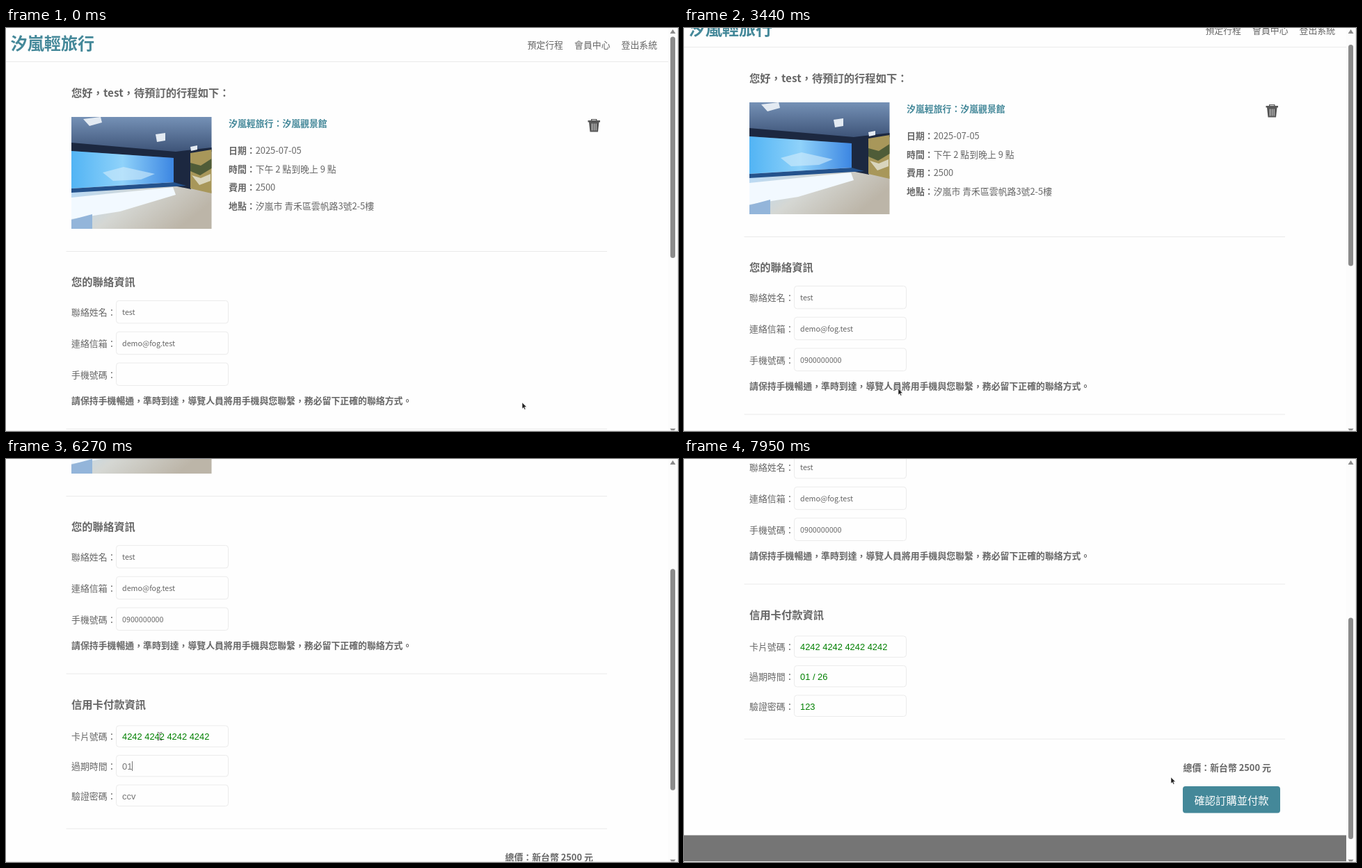
Write an HTML page that moves like this. It is 966 px wide and 580 px high and loops after 8000 ms.

```html
<!DOCTYPE html>
<html lang="zh-Hant">
<head>
<meta charset="utf-8">
<title>預定行程</title>
<style>
  html, body { margin: 0; height: 100%; overflow: hidden; background: #fefefe; }
  svg { display: block; width: 100vw; height: 100vh; }
  text { font: 12.88px "Noto Sans CJK TC", "Noto Sans CJK JP", "Noto Sans CJK", sans-serif; fill: #666; white-space: pre; }
  .b { font-weight: 700; }
  .h { font-size: 15.3px; font-weight: 700; }
  .logo { font-size: 24.15px; font-weight: 700; }
  .teal { fill: #489; }
  .button { font-size: 15.3px; fill: #fff; }
  .in { font-size: 10.73px; }
  .card { font-family: "Liberation Sans", Arial, sans-serif; }
  .line { stroke: #eaeaea; fill: none; }
  .box { stroke: #ebebeb; fill: #fefefe; }
</style>
</head>
<body>
<svg viewBox="0 0 966 580">
  <defs>
    <linearGradient id="ceiling" x2="0" y2="1">
      <stop stop-color="#7591b6"/><stop offset="1" stop-color="#33486c"/>
    </linearGradient>
    <linearGradient id="screen">
      <stop stop-color="#52b4f4"/><stop offset=".5" stop-color="#8fd2fa"/><stop offset="1" stop-color="#3c86e2"/>
    </linearGradient>
    <linearGradient id="floor" x2="1" y2=".4">
      <stop stop-color="#b5dafa"/><stop offset=".5" stop-color="#d5d7d3"/><stop offset="1" stop-color="#bcb5a8"/>
    </linearGradient>
  </defs>

  <g id="page">
    <text class="logo teal" x="6.5" y="31">汐嵐輕旅行</text>
    <text x="749.4" y="29">預定行程</text>
    <text x="817" y="29">會員中心</text>
    <text x="884.6" y="29">登出系統</text>
    <path class="line" d="M0 48.5H952M86.5 321.5H864M86.5 577H864M86.5 800H864"/>

    <text class="h" x="94" y="99">您好，test，待預訂的行程如下：</text>
    <g transform="translate(94 128)">
      <path fill="url(#ceiling)" d="M0 0H201.5V60H0z"/>
      <path fill="url(#floor)" d="M0 106L147 98L201.5 106V161H0z"/>
      <path fill="#1c2840" d="M0 37L150 50L201.5 44V50L172 54V104L147 99V59L0 49z"/>
      <path fill="url(#screen)" d="M0 49L147 59V94L0 103z"/>
      <path fill="#d3edfc" d="M45 80L75 72L120 82L100 90L60 92z" opacity=".6"/>
      <path fill="#24528c" d="M0 103L147 94L165 99L0 109z"/>
      <path fill="#f2f9ff" d="M0 116L146 101L150 112L70 136L0 147z"/>
      <path fill="#93b5da" d="M0 148L30 140V161H0z"/>
      <path fill="#a8975a" d="M171 52L201.5 47V110L171 103z"/>
      <path fill="#4f5c38" d="M171 66L186 70L201.5 60V74L185 84L171 78z"/>
      <path fill="#d9d5bd" d="M173 84L186 88L200 82V92L184 98z"/>
      <path fill="#e3eaf2" d="M17 3L42 0L44 8L26 13zM121 25L135 23V34L123 36zM171 43L181 41V47L172 49z"/>
    </g>
    <text class="b teal" x="320" y="142">汐嵐輕旅行：汐嵐觀景館</text>
    <text x="320" y="181"><tspan class="b">日期：</tspan>2025-07-05</text>
    <text x="320" y="208"><tspan class="b">時間：</tspan>下午 2 點到晚上 9 點</text>
    <text x="320" y="234"><tspan class="b">費用：</tspan>2500</text>
    <text x="320" y="261"><tspan class="b">地點：</tspan>汐嵐市 青禾區雲帆路3號2-5樓</text>
    <path fill="#585858" d="M836.5 133H841V131H849.5V133H854V135.5H852.5L851 149.5H839.5L838 135.5H836.5z"/>
    <path stroke="#e4e4e4" d="M842.5 137.5V147.5M845.3 137.5V147.5M848.1 137.5V147.5M842.3 132.5H848.2"/>

    <text class="h" x="94" y="371">您的聯絡資訊</text>
    <text class="b" x="94" y="541">請保持手機暢通，準時到達，導覽人員將用手機與您聯繫，務必留下正確的聯絡方式。</text>
    <text class="h" x="94" y="627">信用卡付款資訊</text>
    <g id="form"></g>
    <rect id="caret" width="1"/>

    <text class="b" x="717.5" y="846">總價：新台幣 2500 元</text>
    <rect x="717" y="868" width="140" height="38.5" rx="4" fill="#489"/>
    <text class="button" x="733.5" y="894">確認訂購並付款</text>
    <rect y="938.5" width="952" height="90" fill="#757575"/>
  </g>

  <rect x="952" width="14" height="580" fill="#fcfcfc"/>
  <g fill="#8b8b8b">
    <path d="M958.5 2L962.5 8H954.5zM954.5 576.5H962.5L958.5 582z"/>
    <rect id="thumb" x="955" y="12.5" width="7" height="318.5" rx="3.5"/>
  </g>
  <path class="line" d="M965.5 0V579.5H0"/>
  <path id="arrow" fill="#222" stroke="#fff" stroke-width=".5" d="M0 0V9L2 7.2L3.5 10.2L4.9 9.5L3.5 6.6H6.4z"/>
  <path id="beam" fill="none" stroke="#666" d="M-3.5-5.5H-1L0-4.5L1-5.5H3.5M0-4.5V4.5M-3.5 5.5H-1L0 4.5L1 5.5H3.5"/>
</svg>

<script>
const LOOP = 8000, BLINK = 500, STEP = 70, LEFT = 167;
const $ = id => document.getElementById(id);
const add = (name, attrs, text = "") => {
  const el = document.createElementNS("http://www.w3.org/2000/svg", name);
  for (const k in attrs) el.setAttribute(k, attrs[k]);
  el.textContent = text;
  return $("form").appendChild(el);
};

// A typed field gets its text in `steps` equal bursts, one every `every` ms
const contact = [
  { label: "聯絡姓名：", text: "test" },
  { label: "連絡信箱：", text: "demo@fog.test" },
  { label: "手機號碼：", text: "0900000000", focus: 450, start: 1115, every: 165, steps: 10 }
];
const card = [
  { label: "卡片號碼：", hint: "**** **** **** ****", text: "4242 4242 4242 4242", focus: 4560, start: 5200, every: 76, steps: 8 },
  { label: "過期時間：", hint: "MM / YY", text: "01 / 26", focus: 5810, start: 6270, every: 130, steps: 4 },
  { label: "驗證密碼：", hint: "ccv", text: "123", focus: 6660, start: 6860, every: 165, steps: 3 }
];

function layOut(rows, top, pitch, height, isCard) {
  rows.forEach((f, i) => {
    Object.assign(f, { isCard, height, top: top + pitch * i });
    const base = Math.round(f.top + 20.5);
    add("text", { x: 94, y: base + (isCard ? 0 : 1) }, f.label);
    add("rect", { class: "box", x: 158.5, y: f.top, width: 161, height, rx: 4 });
    f.el = add("text", { class: isCard ? "card" : "in", x: LEFT, y: base }, f.text);
    f.caretTop = base - 12;
  });
}
layOut(contact, 392.4, 44.8, 32.5, false);
layOut(card, 651.8, 42.6, 30.5, true);
const fields = [...contact, ...card];
const typed = fields.filter(f => f.steps);

// Moves as [start, end, ...goal]
const scrolls = [[3382, 3720, 267], [3800, 3860, 268], [7650, 7950, 397]];
const mouse = [[60, 620, 292, 497], [3040, 3440, 308, 519], [3440, 3720, 322, 412],
  [3800, 4560, 221, 399], [7190, 7530, 589, 361], [7530, 7950, 700, 458]];

const smooth = p => p * p * (3 - 2 * p);

// Eases through the moves in steps of STEP ms, counted back from each end
function glide(moves, from, t) {
  let at = from;
  for (const [start, end, ...goal] of moves) {
    const left = Math.ceil(Math.max(0, end - t) / STEP) * STEP;
    const p = smooth(Math.max(0, 1 - left / (end - start)));
    at = at.map((v, i) => v + (goal[i] - v) * p);
  }
  return at.map(Math.round);
}

function drawFields(t) {
  let active = null, since = 0;
  for (const f of typed) {
    const n = Math.min(f.steps, Math.max(0, Math.floor((t - f.start) / f.every) + 1));
    f.value = f.text.slice(0, Math.ceil(f.text.length * n / f.steps));
    f.color = !f.isCard ? "#666" : n === f.steps ? "green" : "#757575";
    f.el.textContent = f.value || f.hint || "";
    f.el.style.fill = f.color;
    if (t >= f.focus) {
      active = f;
      since = n ? f.start + f.every * (n - 1) : f.focus;
    }
  }
  const on = active && Math.floor((t - since) / BLINK) % 2 === 0;
  const caret = $("caret");
  caret.style.display = on ? "" : "none";
  if (!on) return;
  const width = active.value ? active.el.getComputedTextLength() : 0;
  caret.setAttribute("x", Math.round(LEFT + width));
  caret.setAttribute("y", active.caretTop);
  caret.setAttribute("height", active.isCard ? 14 : 15);
  caret.setAttribute("fill", active.value ? active.color : "#222");
}

function draw(t) {
  const [scroll] = glide(scrolls, [0], t);
  $("page").setAttribute("transform", `translate(0 ${-scroll})`);
  $("thumb").setAttribute("y", 12.5 + scroll * 0.544);
  drawFields(t);

  const [x, y] = glide(mouse, [742, 539], t);
  const depth = f => y + scroll - f.top;
  const inside = x > 158 && x < 320 && fields.some(f => depth(f) > 0 && depth(f) < f.height);
  for (const id of ["arrow", "beam"]) {
    $(id).setAttribute("transform", `translate(${x} ${y})`);
    $(id).style.display = (id === "beam") === inside ? "" : "none";
  }
}

const start = performance.now();
function tick() {
  draw((performance.now() - start) % LOOP);
  requestAnimationFrame(tick);
}
tick();
</script>
</body>
</html>
```
